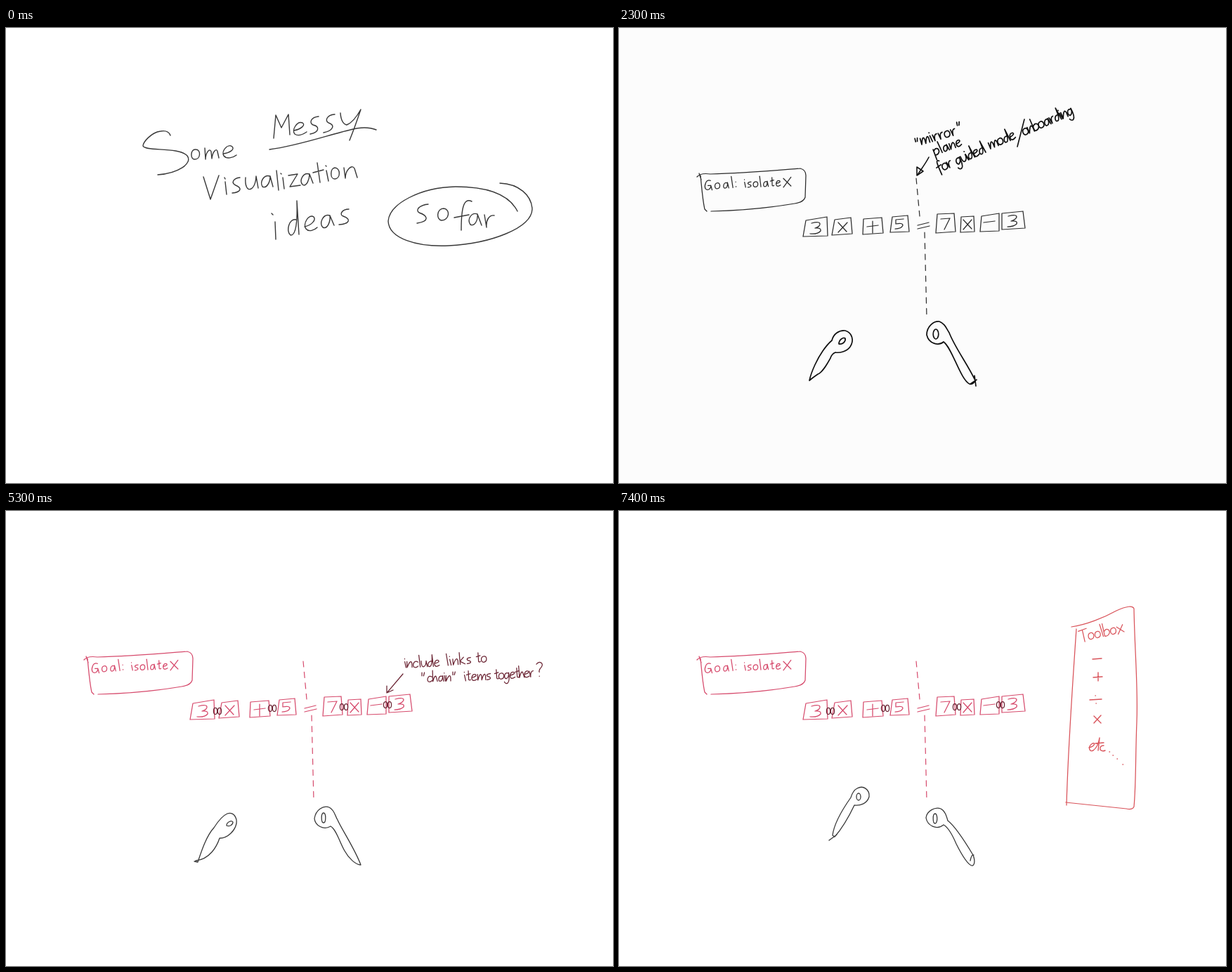
Write an HTML page that moves like this. It is 864x648 px and loops after 8 s.

```html
<!DOCTYPE html>
<html lang="en">
<head>
<meta charset="utf-8">
<title>Visualization ideas</title>
<style>
  html, body { margin: 0; width: 100%; height: 100%; overflow: hidden; background: #fff; }
  svg { display: block; width: 100vw; height: 100vh; }
  path { fill: none; stroke-linecap: round; stroke-linejoin: round; vector-effect: non-scaling-stroke; }
</style>
</head>
<body>
<svg id="stage" viewBox="0 0 864 648"></svg>
<script>
const stage = document.getElementById('stage');
const INK = '#383838', BLACK = '#101010', PINK = '#d64a6c', WINE = '#6a2332', RED = '#d9535a';

// Pen letters: advance width and strokes, baseline at 0, x-height 6.
const LETTERS = {
  a: [6, 'M5-5C1-8-1 0 2 0Q5 0 5-6L6 0'],
  b: [5, 'M0-12L0 0M0-4C3-8 6-5 5-2Q3 1 0 0'],
  c: [5, 'M5-5C1-8-1-2 1 0Q3 1 5-1'],
  d: [6, 'M5-5C1-7-1 0 2 0Q5 0 5-12L6 0'],
  e: [5, 'M0-3Q6-4 4-6Q1-7 0-3Q0 2 5-1'],
  f: [5, 'M5-10C2-13 2-8 2 3M0-5L5-6'],
  g: [6, 'M5-5C1-8-1-1 2 0Q5-1 5-6C6 7 1 6 0 3'],
  h: [5, 'M0-12L0 0Q3-9 4-4L5 0'],
  i: [1, 'M0-6L1 0M0-9L0-8.7'],
  k: [5, 'M0-12L0 0M4-7L0-3L5 0'],
  l: [1, 'M0-12L1 0'],
  m: [8, 'M0-6L0 0Q3-9 4-4L4 0Q7-9 8-4L8 0'],
  n: [5, 'M0-6L0 0Q4-9 5-4L5 0'],
  o: [5, 'M3-6C-1-6-1 0 2 0C6 0 6-6 3-6'],
  p: [5, 'M0-6L0 5M0-4C3-8 6-5 5-2Q3 1 0 0'],
  r: [4, 'M0-6L1 0Q1-6 4-6'],
  s: [4, 'M4-6C0-6-1-4 2-3C5-2 4 0 0 0'],
  t: [4, 'M2-10L2-1Q3 0 4-1M0-6L4-7'],
  u: [5, 'M0-6Q0 0 2 0Q5-1 5-6L6 0'],
  x: [6, 'M0-6L6 0M6-7L0 1'],
  G: [7, 'M6-9C1-11-1-4 0-1C2 2 6 0 6-4L3-4M6-4L7 1'],
  T: [7, 'M0-10L8-11M4-10L4 1'],
  ':': [1, 'M0-6L0-5.7M0-1L0-.7'],
  '"': [3, 'M0-10L0-6M3-10L2-6'],
  '?': [5, 'M0-12C3-16 8-13 5-9Q2-6 3-4M3 0L3 .3'],
};

function path(parent, d, color, width = 1.25, extra = {}) {
  const el = document.createElementNS('http://www.w3.org/2000/svg', 'path');
  const attrs = { d, stroke: color, 'stroke-width': width, ...extra };
  for (const key in attrs) el.setAttribute(key, attrs[key]);
  parent.append(el);
}

function group(label) {
  const el = document.createElementNS('http://www.w3.org/2000/svg', 'g');
  el.setAttribute('aria-label', label);
  stage.append(el);
  return el;
}

// Spaces the letters of a word evenly along a baseline.
function write(parent, word, x1, y1, x2, y2, size, color, width) {
  const chars = [...word];
  const ink = chars.reduce((sum, c) => sum + LETTERS[c][0] * size, 0);
  const gap = (Math.hypot(x2 - x1, y2 - y1) - ink) / Math.max(1, chars.length - 1);
  const angle = Math.atan2(y2 - y1, x2 - x1) * 180 / Math.PI;
  let at = 0;
  for (const c of chars) {
    const transform = `translate(${x1} ${y1}) rotate(${angle}) translate(${at}) scale(${size})`;
    path(parent, LETTERS[c][1], color, width, { transform });
    at += LETTERS[c][0] * size + gap;
  }
}

const oval = (x, y, rx, ry) =>
  `M${x - rx} ${y}a${rx} ${ry} 0 1 1 ${2 * rx} 0a${rx} ${ry} 0 1 1 ${-2 * rx} 0`;

function titleCard() {
  const g = group('Some messy visualization ideas so far');
  [
    // Some
    'M234 153Q231 145 220 147C206 149 195 163 195 168C198 176 246 169 258 182C266 193 245 207 216 209',
    'M270 173C262 172 262 188 269 187C277 187 278 173 270 173M283 171L284 187C284 178 290 170 292 176L293 186C294 176 300 170 301 176L303 185',
    'M309 179C318 178 326 173 322 169C315 164 306 176 310 182C314 187 323 185 328 181',
    // Messy
    'M381 157L384 124L392 142L402 123L404 152M410 146C420 144 427 138 422 135C414 132 406 146 411 151C415 154 422 152 428 148',
    'M445 126C434 127 431 135 437 138C446 140 447 148 433 151M468 123C456 124 454 132 459 135C469 138 466 146 452 149',
    'M476 121Q477 136 485 138Q495 134 505 116Q497 140 489 160M375 173C415 168 460 152 490 145Q512 139 527 145',
    // visualization
    'M281 212L291 244L303 210M312 219L314 237M311 213l1 2M333 213C323 214 320 221 327 224C337 228 334 234 322 235',
    'M341 213C340 224 343 232 349 229C354 226 356 217 356 211L359 228M376 211C367 208 361 219 365 226C371 229 376 220 376 211L380 226',
    'M385 203L388 231M394 213L396 229M391 207l1 1M402 210L415 208L404 226L419 224M432 208C423 205 417 217 422 223C428 227 432 215 432 208L437 221',
    'M443 192L447 220M437 206L452 202M456 203L459 218M455 196l1 1M468 199C461 200 461 215 468 215C477 214 476 199 468 199M481 199L483 214C483 203 492 193 496 200L500 213',
    // ideas
    'M383 276L384 301M378 264l2 2M413 273C403 270 398 290 405 295C413 296 415 275 414 246L417 294M425 283C434 281 442 274 438 269C431 264 422 279 427 286C431 291 439 288 443 284',
    'M461 267C451 264 445 279 451 284C458 287 462 275 461 267L467 281M488 258C478 258 474 266 480 268C492 272 489 279 474 280',
    // so far
    'M601 251C589 252 582 259 588 263C600 267 604 275 585 278M623 257C613 257 612 273 620 274C631 274 633 258 623 257',
    'M663 247C651 241 648 258 648 288M638 270L659 266M671 265C662 262 656 273 661 280C667 283 672 274 671 265L677 281M681 266L684 284C683 273 688 266 695 267',
    'M728 261C715 235 680 226 640 226C590 227 546 250 544 275C545 300 585 312 630 310C690 307 748 285 749 258C748 238 730 222 703 221',
  ].forEach(d => path(g, d, INK, 1.4));
  return g;
}

function equation(color, chained) {
  const g = group('Goal: isolate x. 3x + 5 = 7x - 3');
  path(g, 'M111 212Q116 206 130 208C175 207 220 203 258 200Q266 202 266 210L265 241Q263 248 250 250C215 256 170 260 131 261M114 207L117 216M116 210C118 230 119 245 122 258L125 261', color);
  write(g, 'Goal:', 123, 230, 168, 227, 1.35, color);
  write(g, 'isolate', 179, 227, 230, 225, 1.25, color);
  write(g, 'x', 234, 225, 248, 225, 1.8, color);
  [
    'M266 274L296 269L297 296L262 297ZM307 273L330 270L332 293L303 295Z',
    'M348 272L374 270L376 292L347 294ZM389 269L411 267L413 290L386 291Z',
    'M453 265L477 264L479 290L451 292ZM487 269L505 268L506 290L486 291Z',
    'M516 268L541 264L541 289L514 290ZM545 264L575 261L578 285L545 287Z',
    'M274 278Q286 275 286 279Q286 283 279 285Q288 284 287 289Q283 294 272 293M312 277L324 290M325 277L312 291',
    'M353 283L369 281M361 275L361 292M405 272L394 273L394 279Q404 277 404 281Q402 286 393 286',
    'M425 281L441 277M425 286L442 282M458 272L471 271L463 287M490 273L502 286M502 273L490 287',
    'M519 277L535 275M554 268Q566 265 566 269Q565 273 558 275Q568 274 566 279Q562 283 553 283',
  ].forEach(d => path(g, d, color));
  path(g, 'M423 214L428 268M435 291L438 412', color, 1.2, { 'stroke-dasharray': '8 7.5' });
  if (chained) {
    for (const [x, y] of [[301, 285], [379, 281], [481, 279], [543, 276]])
      path(g, oval(x - 3, y, 2.6, 4.5) + oval(x + 3, y, 2.6, 4.5), WINE);
  }
  return g;
}

function mirrorScene() {
  const g = equation('#2a2a2a', false);
  const note = (...args) => write(g, ...args, BLACK, 1.7);
  note('"', 424, 169, 428, 168, 1.2);
  note('mirror', 431, 166, 480, 152, 1.5);
  note('"', 483, 146, 488, 145, 1.2);
  note('plane', 450, 181, 488, 167, 1.4);
  note('for', 455, 206, 475, 197, 1.5);
  note('guided', 481, 195, 522, 177, 1.5);
  note('mode', 529, 172, 565, 157, 1.5);
  note('onboarding', 577, 153, 648, 122, 1.5);
  path(g, 'M567 169L577 130M441 184C437 192 431 200 425 209', BLACK, 1.6);
  path(g, 'M424 198L424 210L433 204Z', BLACK, 1.6);
  path(g, 'M308 462Q303 464 301 470C296 479 290 490 283 493Q277 497 271 502C274 488 283 470 290 460Q297 450 303 445C305 436 313 430 322 431C332 434 335 445 329 454C324 461 314 463 308 462' +
    'M313 450C313 444 319 440 322 442C323 447 318 451 313 450', BLACK, 1.7);
  path(g, 'M462 447C455 453 441 450 438 437C438 425 448 417 456 418C464 421 466 428 470 434C478 455 497 480 507 502Q504 508 499 507C486 501 474 455 462 447M506 495L508 510M500 507L509 501' +
    oval(451, 436, 3.8, 7), BLACK, 1.7);
  return g;
}

function chainScene() {
  const g = equation(PINK, true);
  const note = (...args) => write(g, ...args, WINE, 1.25);
  note('include', 568, 223, 617, 221, 1.4);
  note('links', 628, 220, 662, 217, 1.4);
  note('to', 670, 216, 684, 215, 1.4);
  note('"', 592, 242, 596, 242, 1.2);
  note('chain', 600, 243, 633, 242, 1.3);
  note('"', 636, 240, 640, 240, 1.1);
  note('items', 653, 242, 690, 240, 1.4);
  note('together', 696, 240, 751, 236, 1.4);
  note('?', 755, 235, 763, 235, 1.4);
  path(g, 'M565 232L543 258M542 249L542 259L551 255', WINE);
  path(g, 'M315 431C325 428 329 438 328 445C326 455 316 466 304 466C300 478 290 496 270 498M268 499L273 500C278 485 285 463 296 451C303 440 308 434 315 431' +
    'M314 448C314 443 321 440 323 443C323 447 318 450 314 448', INK, 1.3);
  path(g, 'M462 449C452 455 440 448 439 438C441 425 452 419 460 422C468 426 468 434 472 440C477 452 496 480 505 504C498 504 488 495 482 484C475 472 470 453 462 449' +
    oval(452, 437, 2.8, 7), INK, 1.3);
  return g;
}

function toolboxScene() {
  const g = equation(PINK, true);
  path(g, 'M644 165C665 162 690 152 708 142Q730 132 733 139C734 200 739 250 737 300C735 350 736 390 733 421Q731 426 722 424L636 415M651 168C646 240 639 340 637 419', RED);
  write(g, 'Toolbox', 657, 186, 719, 172, 1.5, RED);
  // "etc" in joined script
  path(g, 'M669 337C678 335 678 329 674 331C667 335 669 344 675 341Q682 336 684 323L682 341M678 331L690 330M690 334Q684 334 685 340Q688 343 692 341', RED, 1.4);
  path(g, 'M674 211L687 210M675 237L688 236M682 230L682 242M670 269L687 268M678 263l.3 0M679 274l.3 0M676 292L686 302M686 291L676 302' +
    'M698 343l.5 0M703 348l.5 0M709 353l.5 0M717 361l.5 0', RED, 1.4);
  path(g, 'M339 395C348 390 357 397 356 407C353 417 343 420 335 419C325 440 315 455 307 464L304 462C306 445 318 425 330 408Q333 398 339 395M310 461L299 469' +
    oval(341, 407, 3, 5), INK, 1.3);
  path(g, 'M462 447C452 455 439 448 437 437C438 427 450 421 458 424C464 427 466 434 468 441C480 450 498 480 504 490C508 500 505 506 502 505C496 503 488 490 480 474C474 460 468 450 462 447M500 498Q502 488 505 490' +
    oval(450, 438, 2.8, 7), INK, 1.3);
  return g;
}

const LOOP = 8000;
const scenes = [
  { start: 0, view: titleCard(), paper: '#fff' },
  { start: 500, view: mirrorScene(), paper: '#fcfcfc' },
  { start: 3500, view: chainScene(), paper: '#fff' },
  { start: 6500, view: toolboxScene(), paper: '#fff' },
];

const begin = performance.now();
function draw(now) {
  const time = Math.max(0, now - begin) % LOOP;
  const current = scenes.findLast(scene => time >= scene.start);
  for (const scene of scenes) scene.view.style.display = scene === current ? '' : 'none';
  stage.style.background = current.paper;
  requestAnimationFrame(draw);
}
draw(begin);
</script>
</body>
</html>
```
